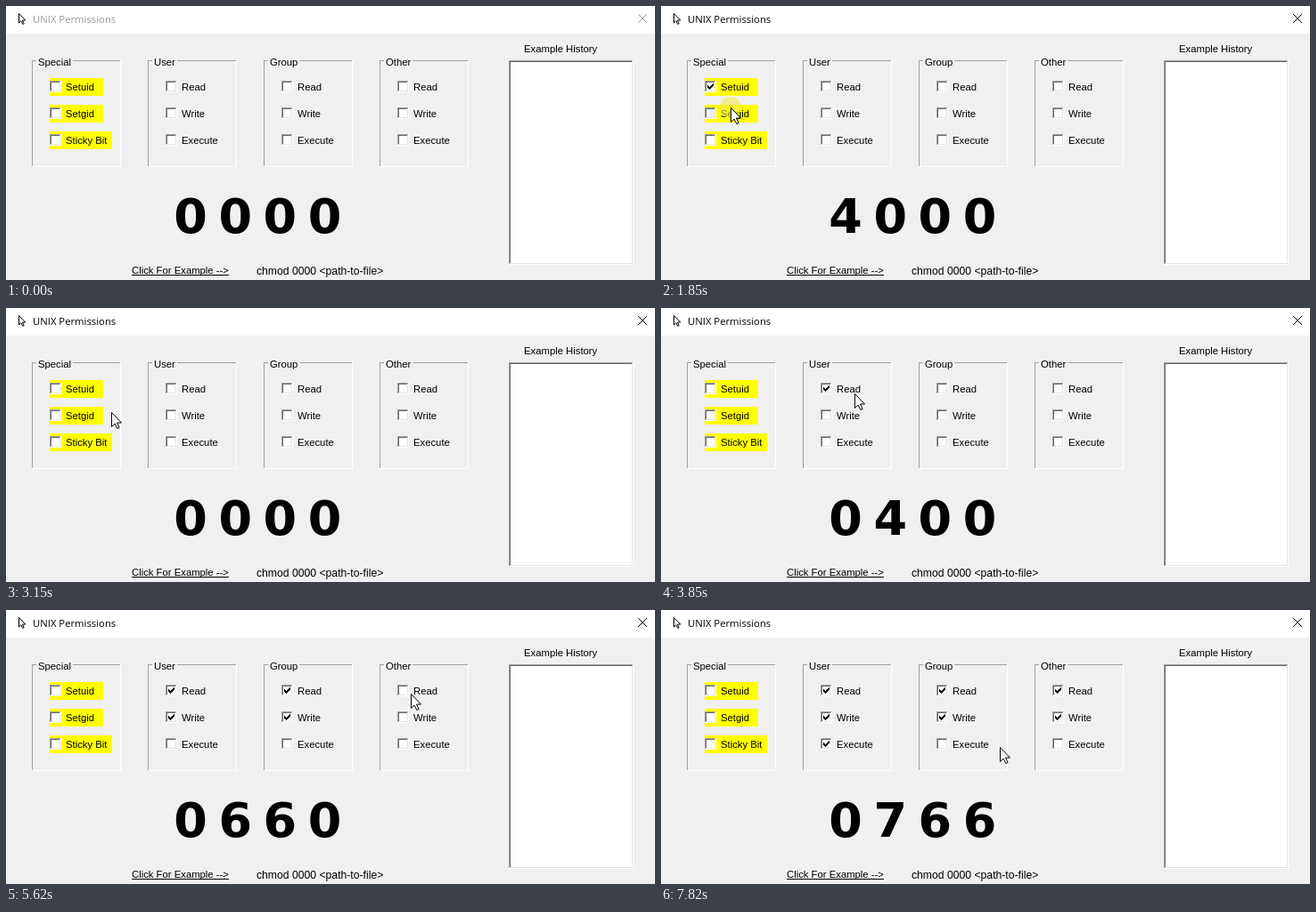
Animation of 728 by 308 pixels, one loop 7990 ms. Source, as an HTML page with a canvas:

```html
<!DOCTYPE html>
<html lang="en">
<head>
<meta charset="utf-8">
<title>UNIX Permissions</title>
<style>
html, body { margin: 0; width: 728px; height: 308px; overflow: hidden; background: #f0f0f0; }
canvas { display: block; }
</style>
</head>
<body>
<canvas id="stage" width="728" height="308"></canvas>
<script>
const LOOP = 7990, TICK = 77, PRESS = 70, ENTER = 160, ACTIVATE = 1070;
const GROUP_X = 29, GROUP_STEP = 130, ROW_Y = 91, ROW_STEP = 30;
const c = document.getElementById('stage').getContext('2d');
const sans = '"Liberation Sans", Arial, sans-serif';
const label = '11.3px ' + sans;
const groups = ['Special', 'User', 'Group', 'Other'];
const special = ['Setuid', 'Setgid', 'Sticky Bit'];
const rights = ['Read', 'Write', 'Execute'];

// Pointer stops: arrival time, x, y
const stops = [
  [330, 211, 126], [750, 77, 88], [1530, 78, 114], [2310, 82, 93], [2920, 80, 116],
  [3380, 230, 118], [3690, 217, 96], [4310, 214, 119], [4700, 314, 120], [5010, 326, 98],
  [5160, 322, 94], [5620, 454, 94], [6090, 458, 124], [6890, 199, 151], [7820, 380, 154]
];

// Longer ways take more ticks; the pointer jumps once per tick.
function pointerAt(t) {
  let x = 543, y = 256;
  for (const [arrival, endX, endY] of stops) {
    const dx = endX - x, dy = endY - y;
    const steps = Math.min(5, 2 + Math.round(Math.hypot(dx, dy) / 90));
    const left = Math.max(0, Math.ceil((arrival - t) / TICK));
    if (left >= steps) break;
    const part = 1 - left / steps;
    x += dx * part;
    y += dy * part;
    if (left) break;
  }
  return [Math.round(x), Math.round(y)];
}

// Each press flips the box under the pointer on release.
const clicks = [ACTIVATE, 1850, 2390, 3000, 3770, 4390, 4700, 5240, 5770, 6260, 6970].map(time => {
  const [x, y] = pointerAt(time);
  return { time, col: Math.floor((x - GROUP_X) / GROUP_STEP), row: Math.round((y - ROW_Y) / ROW_STEP) };
});

function rect(color, x, y, w, h) {
  c.fillStyle = color;
  c.fillRect(x, y, w, h);
}

function text(s, x, y, font = label, color = '#000') {
  c.font = font;
  c.fillStyle = color;
  c.fillText(s, x, y);
}

function bevel(x, y, w, h, dark, light, face) {
  rect(light, x, y, w, h);
  rect(dark, x, y, w - 1, h - 1);
  rect(face, x + 1, y + 1, w - 2, h - 2);
}

function sunken(x, y, w, h, face) {
  bevel(x, y, w, h, '#a0a0a0', '#fff', face);
  bevel(x + 1, y + 1, w - 2, h - 2, '#696969', '#e3e3e3', face);
}

function arrow(x, y, size) {
  c.save();
  c.translate(x + .5, y + .5);
  c.scale(size, size);
  c.fillStyle = '#fff';
  c.strokeStyle = '#000';
  c.lineWidth = 1 / size;
  const shape = new Path2D('M0 0V16L3.6 12.6 6.4 18 8.6 17 6 11.5H11Z');
  c.fill(shape);
  c.stroke(shape);
  c.restore();
}

function drawTitle(color) {
  rect('#fff', 0, 0, 728, 31);
  arrow(14, 8, .66);
  text('UNIX Permissions', 30, 19, '11.3px "Open Sans", "Noto Sans", sans-serif', color);
  c.strokeStyle = color;
  c.lineWidth = 1;
  c.stroke(new Path2D('M709 9L719 19M719 9L709 19'));
}

function drawBox(x, y, checked, pressed) {
  sunken(x, y, 13, 13, pressed ? '#f0f0f0' : '#fff');
  if (checked) for (let i = 0; i < 7; i++) rect('#000', x + 3 + i, y + 7 - Math.abs(i - 2), 1, 3);
}

function drawGroup(name, col, bits, press) {
  const x = GROUP_X + col * GROUP_STEP;
  bevel(x, 61, 100, 120, '#a0a0a0', '#fff', '#f0f0f0');
  c.font = label;
  rect('#f0f0f0', x + 5, 61, c.measureText(name).width + 4, 1);
  text(name, x + 7, 67);
  (col ? rights : special).forEach((right, row) => {
    const y = ROW_Y + row * ROW_STEP;
    if (!col) rect('#ff0', x + 20, y - 10, row < 2 ? 60 : 70, 20);
    drawBox(x + 20, y - 7, bits & 4 >> row, press && press.col === col && press.row === row);
    text(right, x + 38, y + 4);
  });
}

function drawPointer(t, pressed) {
  const [x, y] = pointerAt(t);
  if (pressed) {
    c.fillStyle = 'rgba(242, 234, 80, .6)';
    c.beginPath();
    c.arc(x, y, 12, 0, 7);
    c.fill();
  }
  arrow(x, y, 1);
}

function draw() {
  const t = performance.now() % LOOP;
  const modes = [0, 0, 0, 0];
  for (const { time, col, row } of clicks) if (t >= time + PRESS) modes[col] ^= 4 >> row;
  const press = clicks.find(({ time }) => t >= time && t < time + PRESS);

  rect('#f0f0f0', 0, 0, 728, 308);
  drawTitle(t < ACTIVATE ? '#999' : '#000');
  groups.forEach((name, col) => drawGroup(name, col, modes[col], press));

  c.textAlign = 'center';
  modes.forEach((mode, i) => text(mode, 207 + i * 50.2, 255, 'bold 54px "DejaVu Sans", sans-serif'));
  c.textAlign = 'left';

  text('Example History', 581, 52);
  sunken(564, 61, 140, 230, '#fff');
  text('Click For Example -->', 141, 301);
  rect('#000', 141, 302, 109, 1);
  text('chmod 0000 <path-to-file>', 281, 302, '12.2px ' + sans);

  if (t >= ENTER) drawPointer(t, press);
  requestAnimationFrame(draw);
}
draw();
</script>
</body>
</html>
```
